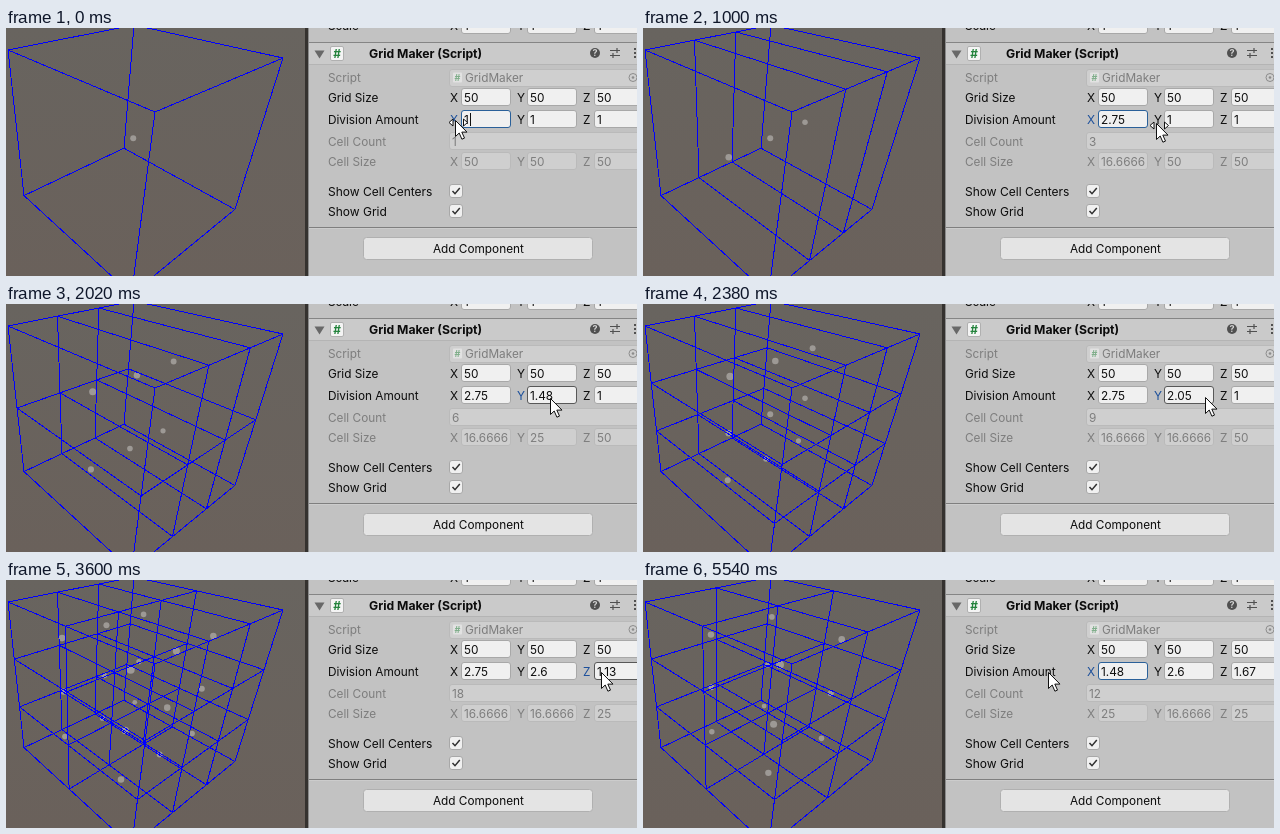
Recreate the animation shown at these times as an HTML page. Size 631 px wide and 248 px high, loop 5590 ms.

```html
<!DOCTYPE html>
<html lang="en">
<head>
<meta charset="utf-8">
<title>Grid Maker</title>
<style>
html, body { margin: 0; width: 100%; height: 100%; overflow: hidden; background: #c2c2c2; }
svg { display: block; width: 631px; height: 248px; font: 11.8px Inter, "Liberation Sans", sans-serif; }
text { fill: #0c0c0c; white-space: pre; }
.off { fill: #7d7d7d; }
.bold { font-weight: 700; }
.mid { text-anchor: middle; }
</style>
</head>
<body>
<svg id="stage" viewBox="0 0 631 248"></svg>
<script>
const LOOP = 5590, STEP = 92.3, LAST = 60;
const svg = document.getElementById('stage');

function add(tag, attrs, parent = svg) {
  const el = document.createElementNS('http://www.w3.org/2000/svg', tag);
  for (const name in attrs) el.setAttribute(name, attrs[name]);
  parent.appendChild(el);
  return el;
}
function label(x, y, str, cls = '', style = '') {
  const el = add('text', { x, y, class: cls, style });
  el.textContent = str;
  return el;
}
function rect(x, y, width, height, fill, extra = {}) {
  return add('rect', { x, y, width, height, fill, ...extra });
}
function field(x, y, width, off) {
  return rect(x + .5, y + .5, width - 1, 17, off ? '#cfcfcf' : '#f0f0f0',
    { rx: 2.5, stroke: off ? '#bababa' : '#a8a8a8' });
}

// Scene view
const sky = add('linearGradient', { id: 'sky', x2: 0, y2: 1 });
add('stop', { offset: 0, 'stop-color': '#68645f' }, sky);
add('stop', { offset: 1, 'stop-color': '#6a615b' }, sky);
rect(0, 0, 300, 248, 'url(#sky)');
const dots = add('g', { fill: '#9d9995' });
const wires = add('path', { fill: 'none', stroke: '#00f', 'shape-rendering': 'crispEdges' });

// Inspector
rect(299, 0, 332, 248, '#c2c2c2');
rect(299, 0, 3, 248, '#35322f');
rect(302, 0, 1, 248, '#8a8a8a');

const COLS = [444, 511, 577], FIELDS = [455, 521, 588], AXES = 'XYZ';
function vectorRow(name, y, value, off) {
  const cls = off ? 'off' : '';
  label(322, y, name, cls);
  return COLS.map((x, i) => ({
    axis: label(x, y, AXES[i], cls),
    box: field(FIELDS[i], y - 14, 50, off),
    text: label(FIELDS[i] + 3, y, value, cls)
  }));
}

vectorRow('Scale', 2, 1);
rect(303, 14, 328, 1, '#858585');
rect(303, 15, 328, 21, '#cacaca');
rect(303, 36, 328, 1, '#b4b4b4');
add('path', { d: 'M308.5 22.5h10l-5 8z', fill: '#686868' });
rect(324.5, 18.5, 13, 14, '#f4f4f4', { rx: 1.5, stroke: '#b0b0b0' });
label(331, 30, '#', 'bold mid', 'fill:#23833c');
label(363, 30, 'Grid Maker (Script)', 'bold', 'font-size:12.2px');

// Header icons
add('circle', { cx: 589, cy: 25, r: 5, fill: '#505050' });
label(589, 28, '?', 'bold mid', 'fill:#d4d4d4;font-size:9px');
add('path', { d: 'M604 22.5h10M604 27.5h10M611 20v5M607 25v5', stroke: '#505050', 'stroke-width': 1.2 });
for (const y of [20, 24, 28]) rect(628, y, 2, 2, '#505050');

label(322, 54, 'Script', 'off');
field(443, 41, 200, true);
rect(447, 44.5, 9, 10, '#e2e2e2', { rx: 1 });
label(451.5, 53, '#', 'bold mid', 'fill:#7fae8a;font-size:9px');
label(459, 54, 'GridMaker', 'off');
add('circle', { cx: 627, cy: 49.5, r: 4, fill: 'none', stroke: '#8c8c8c' });
add('circle', { cx: 627, cy: 49.5, r: 1.3, fill: '#8c8c8c' });

vectorRow('Grid Size', 74, 50);
const division = vectorRow('Division Amount', 96, 1);
label(322, 118, 'Cell Count', 'off');
field(443, 104, 200, true);
const count = label(446, 118, 1, 'off');
const cellSize = vectorRow('Cell Size', 138, 50, true);

['Show Cell Centers', 'Show Grid'].forEach((name, i) => {
  const y = 168 + i * 20;
  label(322, y, name, '', 'font-size:12px');
  rect(443.5, y - 11.5, 13, 13, '#f0f0f0', { rx: 2.5, stroke: '#a8a8a8' });
  add('path', { d: `M446.5 ${y - 5}l2.5 2.7 4.8-5.7`, fill: 'none', stroke: '#303030', 'stroke-width': 1.5 });
});

rect(303, 199, 328, 1, '#7f7f7f');
rect(303, 200, 328, 1, '#cccccc');
rect(357.5, 209.5, 229, 22, '#e4e4e4', { rx: 3, stroke: '#b0b0b0' });
label(472.4, 225, 'Add Component', 'mid');

const caret = rect(464, 85, 1, 13, '#101010');
const cursor = add('g', {});
const arrow = add('path', {
  d: 'M.5 .5v16l3.7-3.5 2.7 6.2 2.6-1.1-2.7-6h5.2z', fill: '#fff', stroke: '#101010'
}, cursor);
const scrubMark = add('path', {
  d: 'M-2 -1v7l-4-3.5zM8.5 -1v7l4-3.5z', fill: '#fff', stroke: '#101010'
}, cursor);
const beam = add('path', {
  d: 'M-3 -6.5h2.5l.5 .5 .5-.5h2.5M0-6v14M-3 8.5h2.5l.5-.5 .5 .5h2.5', fill: 'none', stroke: '#202020'
}, cursor);

// Perspective: homogeneous near corner plus one edge vector per axis
const corner = [149, 84, 1];
const edges = [[277, 30, 1.457], [125.5, 266.3, 1.45], [2, 22, 1.557]]
  .map(([x, y, w]) => [x * w - corner[0], y * w - corner[1], w - 1]);
function project(p) {
  const [x, y, w] = corner.map((c, i) => c + p.reduce((sum, t, a) => sum + t * edges[a][i], 0));
  return [x / w, y / w, w];
}

function drawGrid(n) {
  const point = p => project(p).slice(0, 2).map(v => v.toFixed(1)).join(' ');
  let d = '';
  for (let a = 0; a < 3; a++) {
    const b = (a + 1) % 3, c = (a + 2) % 3;
    for (let i = 0; i <= n[b]; i++) for (let j = 0; j <= n[c]; j++) {
      const p = [0, 0, 0];
      p[b] = i / n[b];
      p[c] = j / n[c];
      d += 'M' + point(p);
      p[a] = 1;
      d += 'L' + point(p);
    }
  }
  wires.setAttribute('d', d);

  dots.replaceChildren();
  for (let i = 0; i < n[0]; i++) for (let j = 0; j < n[1]; j++) for (let k = 0; k < n[2]; k++) {
    const [x, y, w] = project([(i + .5) / n[0], (j + .5) / n[1], (k + .5) / n[2]]);
    add('circle', { cx: x + .3, cy: y + .5, r: 5.2 / w }, dots);
  }
}

// Each drag scrubs one axis while the pointer crosses x and y; then it rests until the next
const drags = [
  { axis: 0, start: 1, end: 11, value: [1, 2.75], x: [449, 513], y: [92, 95], rest: 513 },
  { axis: 1, start: 15, end: 29, value: [1, 2.6], x: [513, 575], y: [95, 92], rest: 593 },
  { axis: 2, start: 34.5, end: 46, value: [1, 1.67], x: [585, 611], y: [92, 92], rest: 467 },
  { axis: 0, start: 54, end: 60, value: [2.75, 1.48], x: [449, 405], y: [92, 92], rest: 405 }
];
const lerp = ([a, b], f) => a + (b - a) * f;
const clamp = f => Math.max(0, Math.min(1, f));

function render(k) {
  const current = Math.max(0, drags.findLastIndex(d => d.start <= k));
  const drag = drags[current], next = drags[current + 1];
  const amounts = [1, 1, 1];
  for (const d of drags.slice(0, current + 1)) {
    const p = clamp((k - d.start) / (d.end - d.start));
    amounts[d.axis] = Math.round(lerp(d.value, p ** 1.74) * 100) / 100;
  }
  const cells = amounts.map(Math.ceil);
  drawGrid(cells);

  const p = clamp((k - drag.start) / (drag.end - drag.start));
  let x = lerp(drag.x, p);
  if (k > drag.end && next) {
    x = lerp([drag.rest, next.x[0]], ((k - drag.end) / (next.start - drag.end)) ** 3);
  }
  const over = FIELDS.findIndex(left => x >= left && x < left + 50);
  const onLabel = COLS.some(left => x >= left - 1 && x < left + 10);
  const isBeam = k > drag.end && over >= 0;

  division.forEach(({ axis, box, text }, i) => {
    const focused = i === drag.axis;
    text.textContent = amounts[i];
    axis.style.fill = focused ? '#1b4f9b' : '';
    box.setAttribute('stroke', i === over ? '#585858' : focused ? '#2a6099' : '#a8a8a8');
    cellSize[i].text.textContent = String(50 / cells[i]).slice(0, 7);
  });
  count.textContent = cells[0] * cells[1] * cells[2];

  const show = (el, on) => { el.style.display = on ? '' : 'none'; };
  cursor.setAttribute('transform', `translate(${Math.round(x)} ${Math.round(lerp(drag.y, p))})`);
  show(arrow, !isBeam);
  show(beam, isBeam);
  show(scrubMark, !isBeam && onLabel);
  show(caret, k <= drags[0].start);
}

// The screen refreshes in steps that land on multiples of 20 ms
function stepAt(t) {
  const k = Math.floor(t / STEP) + 1;
  const begin = Math.floor(k * STEP / 20) * 20;
  return Math.min(begin > t ? k - 1 : k, LAST);
}

let shown = -1;
const start = performance.now();
function tick() {
  const k = stepAt((performance.now() - start) % LOOP);
  if (k !== shown) render(shown = k);
  requestAnimationFrame(tick);
}
tick();
</script>
</body>
</html>
```
